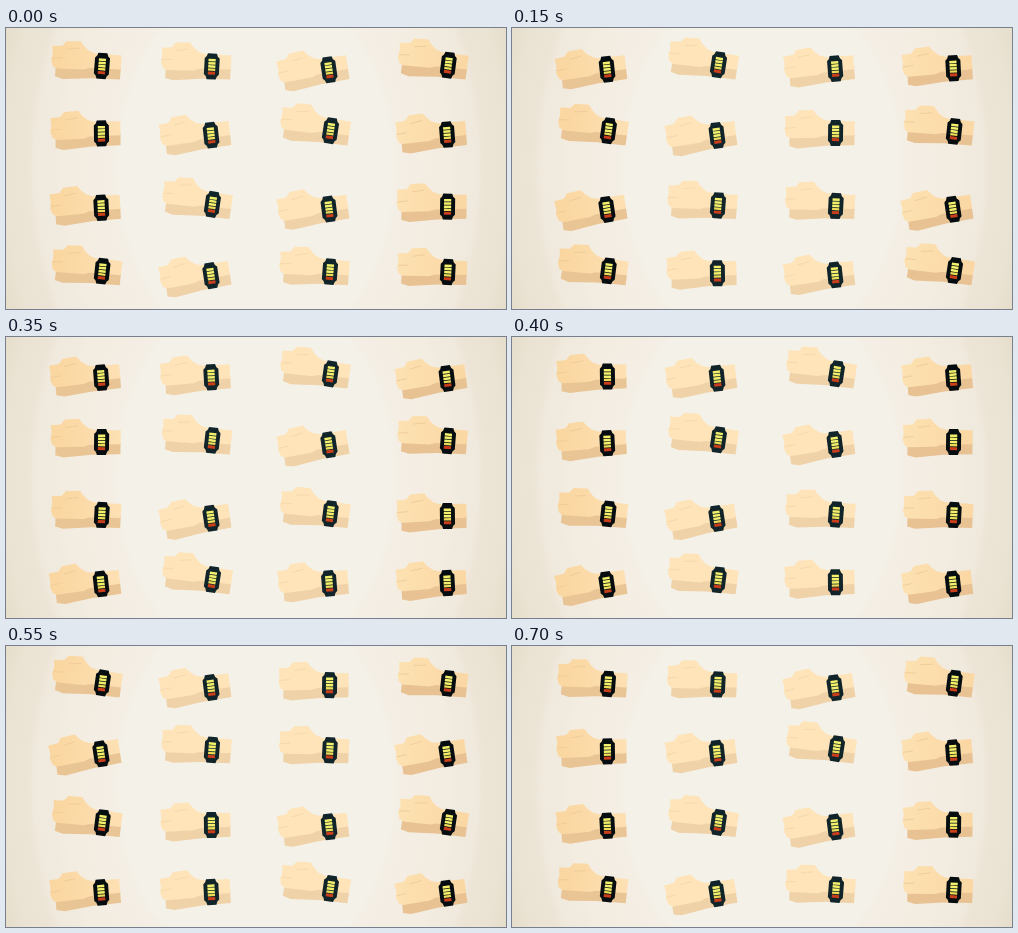
An HTML page for the animation above (0.75 s loop, 500 by 281 pixels).

```html
<!DOCTYPE html>
<html lang="en">
<head>
<meta charset="utf-8">
<title>Waving wrists</title>
<style>
  html, body { margin: 0; width: 100%; height: 100%; overflow: hidden; background: #f4f1e8; }
  svg { display: block; width: 100vw; height: 100vh; }
  .skin { fill: var(--skin); }
  .shade { fill: var(--shade); }
  .crease { fill: none; stroke: var(--shade); stroke-width: 1; opacity: .65; }
  .watch { fill: var(--watch); }
  .inner { --skin: #fee4b8; --shade: #f0d2a8; --watch: #10242a; }
  .left { --skin: url(#warmLeft); --shade: #e9c595; --watch: #060d10; }
  .right { --skin: url(#warmRight); --shade: #e8c292; --watch: #060d10; }
</style>
</head>
<body>
<svg viewBox="0 0 500 281" preserveAspectRatio="none">
  <defs>
    <radialGradient id="glow" gradientUnits="userSpaceOnUse" cx="0" cy="0" r="1"
      gradientTransform="translate(250 140) scale(290 395)">
      <stop offset=".47" stop-color="#f4f1e8"/>
      <stop offset=".5" stop-color="#f4eee4"/>
      <stop offset=".67" stop-color="#f3ece1"/>
      <stop offset=".7" stop-color="#f1eade"/>
      <stop offset=".76" stop-color="#f0e9dd"/>
      <stop offset=".79" stop-color="#ece5d6"/>
      <stop offset=".87" stop-color="#eae3d3"/>
      <stop offset=".95" stop-color="#e5dcc8"/>
    </radialGradient>
    <linearGradient id="warmLeft">
      <stop stop-color="#fad69f"/><stop offset="1" stop-color="#fde0b3"/>
    </linearGradient>
    <linearGradient id="warmRight">
      <stop stop-color="#fde1b1"/><stop offset="1" stop-color="#fad7a3"/>
    </linearGradient>
    <g id="hand">
      <path class="shade" d="M-46 3V14L-38 16L-10 13L19 12V0Z"/>
      <path class="skin" d="M-51-16L-41-17L-37-22L-23-23L-19-18L-14-14L-8-12L19-12V2L-12 3L-18 5L-45 6L-49 4L-51-2L-50-9Z"/>
      <path class="crease" d="M-36-14L-24-16M-50-4L-40-5M-45 10L-20 9"/>
      <path class="watch" d="M-4.5-13H4.5L5.5-10L7.5-8V8L5.5 10L4.5 13H-4.5L-5.5 10L-7.5 8V-8L-5.5-10Z"/>
      <g fill="#f4f06c">
        <path d="M-3.6-7.5H3.6V-5H-3.6ZM-3.6-4.3H3.6V-1.8H-3.6ZM-3.6-1.1H3.6V1.4H-3.6Z"/>
        <path fill="#ecdc58" d="M-3.6 2.1H3.6V4.4H-3.6Z"/>
        <path fill="#c93f1c" d="M-3.6 5.2H3.6V8.2H-3.6Z"/>
      </g>
    </g>
  </defs>
  <rect width="500" height="281" fill="url(#glow)"/>
  <g id="hands"></g>
</svg>
<script>
  const COLS = [95.5, 205.5, 323.5, 441.5];
  const ROWS = [39.3, 105.2, 178.8, 245];
  const TONES = ['left', 'inner', 'inner', 'right'];
  const LOOP = 750, STEP = 50, PERIOD = 700;
  const SWING = 8.8, FIRST_PEAK = 585, DELAY = 250;
  const PIVOT = '17 5';

  const layer = document.getElementById('hands');
  const hands = ROWS.flatMap((y, row) => COLS.map((x, col) => {
    const use = document.createElementNS('http://www.w3.org/2000/svg', 'use');
    use.setAttribute('href', '#hand');
    use.setAttribute('class', TONES[col]);
    layer.append(use);
    return { use, x, y, peak: FIRST_PEAK + DELAY * (row * 4 + col) };
  }));

  function draw(time) {
    const t = Math.floor(time % LOOP / STEP) * STEP;
    for (const { use, x, y, peak } of hands) {
      const angle = SWING * Math.cos(2 * Math.PI * (t - peak) / PERIOD);
      use.setAttribute('transform', `translate(${x} ${y}) rotate(${angle.toFixed(3)} ${PIVOT})`);
    }
  }

  const start = performance.now();
  function tick() {
    draw(performance.now() - start);
    requestAnimationFrame(tick);
  }
  tick();
</script>
</body>
</html>
```
